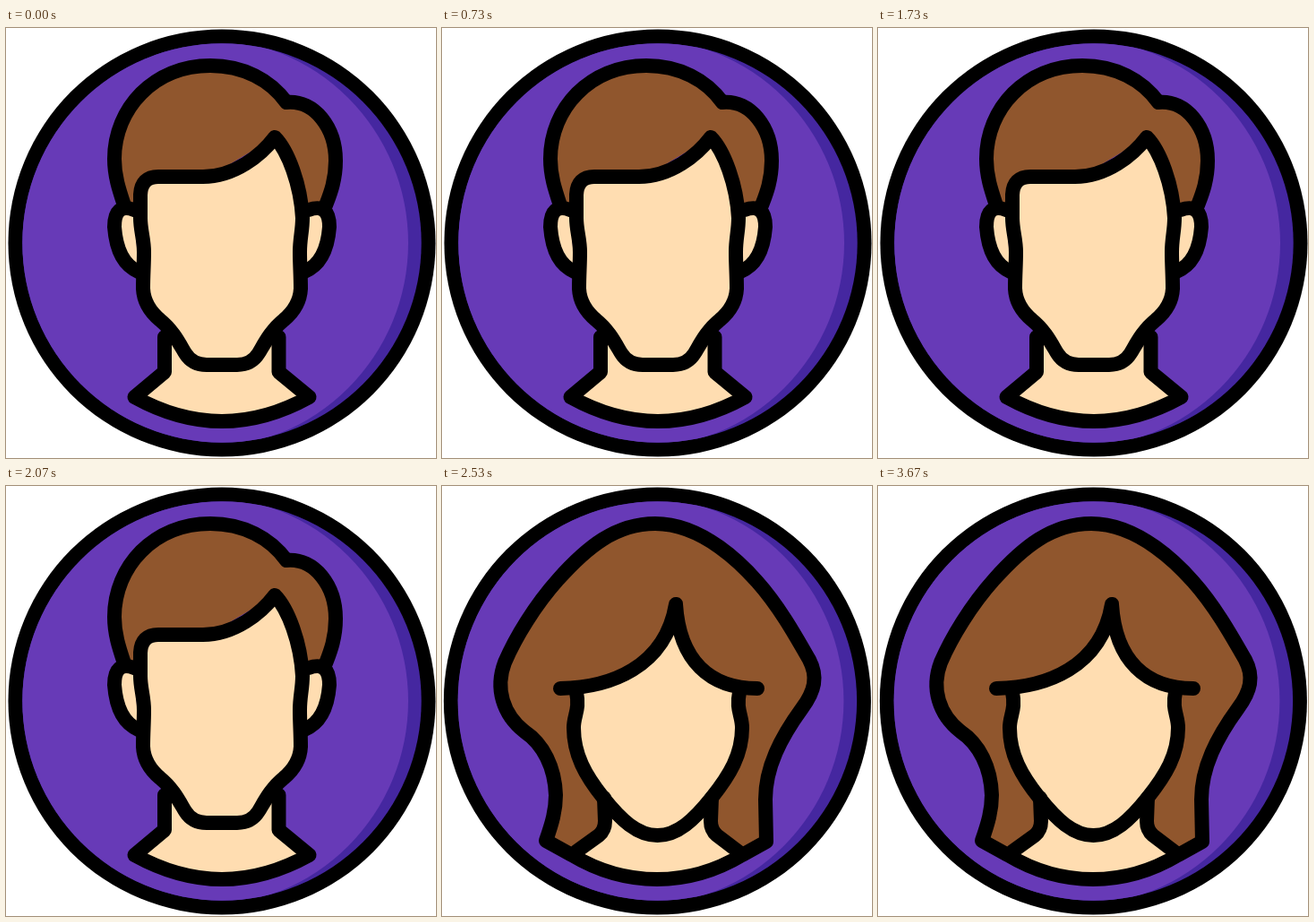
Write an HTML page with a canvas that moves like this. It is 480 px wide and 480 px high and loops after 4.27 s.

```html
<!DOCTYPE html>
<html lang="en">
<head>
<meta charset="utf-8">
<title>Avatars</title>
<style>
  html, body { margin: 0; width: 100%; height: 100%; overflow: hidden; background: #fff; }
  canvas { display: block; width: 480px; height: 480px; }
</style>
</head>
<body>
<canvas id="stage" width="480" height="480"></canvas>
<script>
const ctx = document.getElementById('stage').getContext('2d');
const LOOP = 4270, SWITCH = 2130;
const PURPLE = '#673ab7', SHADE = '#4527a0', HAIR = '#90562d', SKIN = '#ffddb1';

function fill(color, d) {
  ctx.fillStyle = color;
  ctx.fill(new Path2D(d));
}

function stroke(...paths) {
  ctx.strokeStyle = '#000';
  ctx.lineWidth = 16;
  ctx.lineCap = ctx.lineJoin = 'round';
  for (const d of paths) ctx.stroke(new Path2D(d));
}

function disc(x, y, r, color) {
  ctx.beginPath();
  ctx.arc(x, y, r, 0, Math.PI * 2);
  ctx.fillStyle = color;
  ctx.fill();
}

function badge(x, y) {
  disc(x, y, 238.5, '#000');
  disc(x, y, 222.7, SHADE);
  ctx.save();
  ctx.beginPath();
  ctx.arc(x, y, 222.7, 0, Math.PI * 2);
  ctx.clip();
  disc(x - 21, y, 229, PURPLE);
  ctx.restore();
}

function drawMan() {
  const neck = 'M177 345 V384 L143.5 412 Q241 466 338.5 412 L304.5 384 V345';
  const ears = [
    'M143 203 Q121 195 121 222 Q124 262 148 272',
    'M338 203 Q361 195 361 222 Q358 262 333 272'
  ];
  const crown = 'M132 198 C126 180 121 165 121 146 C121 90 165 42 228 42 ' +
    'C265 42 295 58 313 83 C345 80 368 112 368 148 C368 170 362 185 357 198';
  const fringe = 'L150 186 Q151 166 170 166 L220 166 C255 166 285 142 300 122';
  const temple = 'C315 137 329 175 331 212';
  const jaw = 'C331 226 328 235 328 250 C328 265 329 275 329 291 Q328 311 310 326 ' +
    'C296 337 288 353 282 363 Q274 376 258 376 L224 376 Q208 376 200 363 ' +
    'C194 353 186 337 172 326 Q154 311 153 291 C153 275 154 265 154 250 C154 235 150 226 150 212';
  const face = 'M150 212 ' + fringe + temple + jaw + 'Z';

  badge(241, 240);
  fill(SKIN, neck);
  ears.forEach(d => fill(SKIN, d));
  fill(HAIR, crown + 'L331 212 L300 122 L150 212 Z');
  fill(SKIN, face);
  stroke(neck, ...ears, crown, face);
}

function drawWoman() {
  const outline = 'M116 396 C123 376 127 362 127 345 C126 314 113 288 92 274 ' +
    'C68 255 59 226 70 197 C82 169 104 133 129 105 C162 68 194 42 238 42 ' +
    'C292 42 337 90 352 107 C376 134 394 166 410 194 C420 213 416 229 402 248 ' +
    'C378 281 361 314 361 350 L362 397';
  const collar = 'L335 412 Q290 439 240 439 Q190 439 145 412 Z';
  const neckLeft = 'L182 374 Q182 384 175 390 L150 408';
  const locks = [
    'M181 348 ' + neckLeft,
    'M301 348 L300 374 Q300 384 307 390 L332 409'
  ];
  const fringe = 'M132 226 C187 225 249 203 261 132 C265 195 299 226 352 226';
  const jaw = 'M150 230 C154 250 147 256 147 270 C147 300 160 323 180 348 ' +
    'C200 373 218 390 240.5 390 C263 390 281 373 301 348 ' +
    'C321 323 335 300 335 270 C335 256 328 250 332 230';

  badge(240.4, 240);
  fill(HAIR, outline + collar);
  fill(SKIN, 'M181 348 ' + neckLeft + 'Q190 439 240 439 ' +
    'Q290 439 332 409 L307 390 Q300 384 300 374 L301 348 Z');
  fill(SKIN, jaw + 'C297 222 266 190 261 132 C250 200 190 222 150 226 Z');
  stroke(outline + collar, ...locks, jaw, fringe);
}

function render(now) {
  ctx.fillStyle = '#fff';
  ctx.fillRect(0, 0, 480, 480);
  if (now % LOOP < SWITCH) drawMan();
  else drawWoman();
}

const start = performance.now();
function tick() {
  render(performance.now() - start);
  requestAnimationFrame(tick);
}
tick();
</script>
</body>
</html>
```
